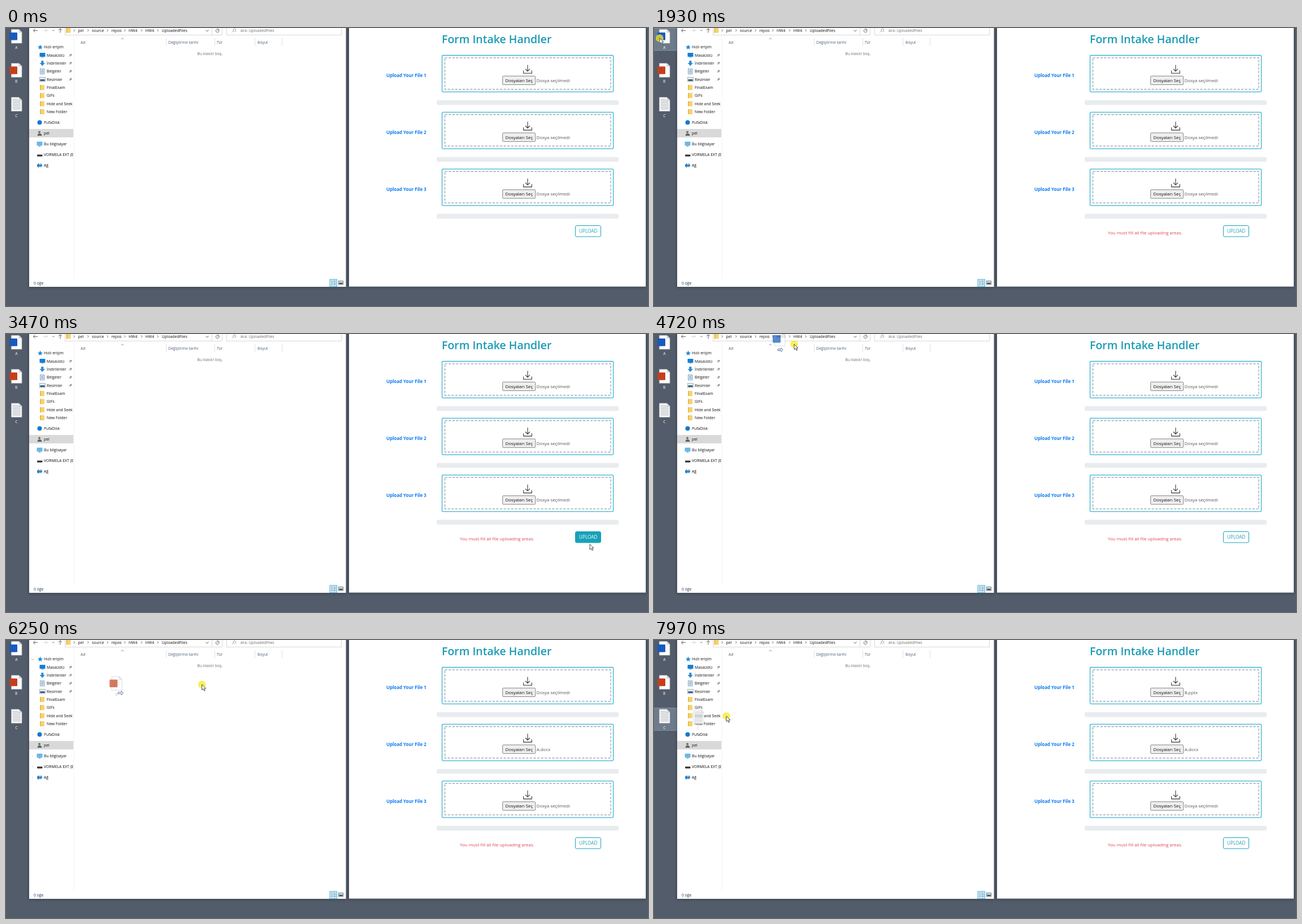
An HTML page for the animation above (8000 ms loop, 1136x493 px).

```html
<!DOCTYPE html>
<html lang="tr">
<head>
<meta charset="utf-8">
<title>Upload demo</title>
<style>
  html, body { margin: 0; width: 100%; height: 100%; overflow: hidden; background: #535c6a; }
  svg { display: block; }
  text { font: 6.85px "Open Sans", "Noto Sans", sans-serif; fill: #111; }
  .page text { font-size: 7.9px; fill: #555; }
  .page .title { font-size: 19.5px; font-weight: 600; fill: #1c9bb5; }
  .page .label { font-weight: 700; fill: #0d7bf2; }
  .page .pick { fill: #111; }
  .page .error { fill: #dc4450; }
  .send rect { fill: #fff; stroke: #17a2b8; }
  .page .send text { font-size: 8.2px; fill: #17a2b8; }
  .send.hover rect { fill: #17a2b8; }
  .page .send.hover text { fill: #fff; }
  .column { fill: #4a607c; }
  .soft { fill: #6d6d6d; }
  .status { fill: #1e395b; }
  .caption { fill: #fff; text-anchor: middle; }
  .mid { text-anchor: middle; }
  .line { fill: none; stroke: #555; stroke-width: .9; }
  .rule { fill: none; stroke: #e2e2e2; }
  #ghost { opacity: .7; }
  #ghost .caption { fill: #aaa; }
  #tip text { fill: #1d3a9c; }
</style>
</head>
<body>
<svg id="stage" width="1136" height="493" viewBox="0 0 1136 493">
  <defs>
    <filter id="shade" x="-5%" y="-5%" width="110%" height="110%">
      <feDropShadow dx="0" dy="1" stdDeviation="2.5" flood-color="#20262f" flood-opacity=".55"/>
    </filter>
    <clipPath id="nav"><rect x="41" y="0" width="78.5" height="459"/></clipPath>
    <path id="sheet" d="M9.5 2.5H23L28 7.5V27H9.5Z" fill="#fdfdfd" stroke="#b9bcc2" stroke-width=".7"/>
    <path id="fold" d="M23 2.5V7.5H28Z" fill="#dfe1e5" stroke="#b0b3b9" stroke-width=".6"/>
  </defs>
  <rect width="1136" height="493" fill="#535c6a"/>
  <g id="desktop"></g>
  <g id="explorer">
    <rect x="41" y="-20" width="560.5" height="479" fill="#fff" filter="url(#shade)"/>
  </g>
  <g class="page" id="page">
    <rect x="607" y="-20" width="525" height="478.5" fill="#fff" filter="url(#shade)"/>
    <text class="title" x="771" y="27">Form Intake Handler</text>
    <g id="slots"></g>
    <text class="error" id="error" x="803" y="365.5">You must fill all file uploading areas.</text>
    <g class="send" id="send">
      <rect x="1007.5" y="350.5" width="45" height="19.5" rx="2.2"/>
      <text class="mid" x="1030.2" y="363.3">UPLOAD</text>
    </g>
  </g>
  <g id="ghost"></g>
  <path id="arrow" class="line" style="stroke:#50709c" d="M-4 -1.3H2V-3.5L5 0L2 3.5V1.3H-4Z"/>
  <circle id="press" r="6.8" fill="#f8e920" fill-opacity=".75"/>
  <g id="tip">
    <rect x="6.5" y="7.5" width="40.5" height="11.5" fill="#fff" stroke="#a5a5a5" stroke-width=".9"/>
    <path d="M9.3 13.2H14.9M12.1 10.4V16" stroke="#1d3a9c" stroke-width="1.4"/>
    <text x="17.6" y="15.8">Kopyala</text>
  </g>
  <path id="cursor" d="M0 0V9.6L2.3 7.5L4 11.2L5.6 10.5L4 6.9H7Z" fill="#fff" stroke="#222" stroke-width=".8"/>
</svg>
<script>
const $ = id => document.getElementById(id);
const add = (id, markup) => $(id).insertAdjacentHTML('beforeend', markup);
const text = (x, y, s, cls = '') => `<text x="${x}" y="${y}" class="${cls}">${s}</text>`;
const box = (x, y, w, h, fill, extra = '') =>
  `<rect x="${x}" y="${y}" width="${w}" height="${h}" fill="${fill}" ${extra}/>`;
const path = (d, extra = 'class="line"') => `<path d="${d}" ${extra}/>`;

// Desktop files
const files = ['A', 'B', 'C'];
const marks = ['#185abd', '#c43e1c'];
function fileIcon(i) {
  const rows = Array.from({ length: 8 }, (_, r) => `M11.5 ${6 + r * 2.5}H${r ? 26 : 21}`).join('');
  const mark = marks[i]
    ? box(6, 8, 14, 13.5, marks[i], 'rx="1"')
    : path(rows, 'stroke="#a4a8ae" stroke-width=".9"');
  return `<g transform="translate(0 ${i * 60.2})"><use href="#sheet"/><use href="#fold"/>${mark}`
    + text(18.3, 37.3, files[i], 'caption') + '</g>';
}
files.forEach((f, i) => {
  add('desktop', box(-.5, i * 60.2 + .3, 40.5, 39.5, '#7d8c9d',
    `id="hot${i}" fill-opacity=".65" stroke="#93a1b0" stroke-width=".8"`));
  add('desktop', fileIcon(i));
  add('ghost', `<g id="ghost${i}">${fileIcon(i)}</g>`);
});

// Explorer
const folder = (x, y) => box(x, y - 4.5, 8, 9, '#f6d271', 'rx=".6"') + box(x, y - 4.5, 2, 9, '#e9bb4b');
const screen = (x, y, c) => box(x, y - 4, 10, 7, c, 'rx=".5"') + box(x + 3, y + 3.5, 4, 1, '#5d7c94');
const nav = [
  ['Hızlı erişim', 34, 67, path('M60.5 29.3L61.8 32.4L65 32.7L62.6 34.8L63.3 38L60.5 36.3L57.7 38L58.4 34.8L56 32.7L59.2 32.4Z', 'fill="#2389d7"')],
  ['Masaüstü', 48.3, 72, screen(59.5, 48, '#1580d8')],
  ['İndirilenler', 62.6, 72, path('M62.3 58H66.3V62H69L64.3 67.3L59.6 62H62.3Z', 'fill="#2b8bd6"')],
  ['Belgeler', 77, 72, box(60.5, 72.5, 7.5, 9, '#e8f1fa', 'stroke="#6d8fb0" stroke-width=".8"') + path('M62 75H66.5M62 77H66.5M62 79H66.5', 'stroke="#4683c0" stroke-width=".8"')],
  ['Resimler', 91.2, 72, box(59.5, 87.3, 10, 7.5, '#e4eef5', 'stroke="#8a98a5" stroke-width=".7"') + box(60.5, 91, 8, 3, '#41607a')],
  ...['FinalExam', 'GIFs', 'Hide and Seek', 'New Folder'].map((s, i) => {
    const y = 105.5 + i * 14.35;
    return [s, y, 72, folder(60, y)];
  }),
  ['PufaDisk', 167.6, 67, '<circle cx="59.5" cy="167.6" r="4" fill="#1279d0"/>'],
  ['pel', 186.6, 67, '<circle cx="59" cy="184.5" r="2.1" fill="#8b6a55"/>' + path('M55.5 191Q56 186.8 59.5 187Q63 187 63.5 191Z', 'fill="#4c6670"')],
  ['Bu bilgisayar', 205.8, 67, screen(54.5, 205.5, '#67b7e8')],
  ['VORMELA EXT (E:)', 224.8, 67, box(55, 224.5, 9.5, 3.2, '#333', 'rx="1"')],
  ['Ağ', 244, 67, path('M55 242L59 240V242.2H61V239.4L64.5 243.5L61 247.8V245.6H59V247.5L55 246Z', 'fill="#2f86c5"')]
];
const open = [0, 9, 10, 11, 12, 13];
add('explorer', box(41, 179, 78.3, 15, '#d9d9d9'));
add('explorer', '<g clip-path="url(#nav)">' + nav.map(([s, y, x, icon]) => icon + text(x, y + 2.4, s)).join('') + '</g>');
add('explorer', nav.slice(1, 5).map(([, y]) =>
  `<g transform="translate(114 ${y}) rotate(45)">${box(-1.4, -2.7, 2.8, 3, '#8e979e')}${path('M-2.3 .7H2.3M0 .7V3.5', 'stroke="#8e979e" stroke-width=".9"')}</g>`).join(''));
add('explorer', '<g id="twigs">' + open.map(i => {
  const y = nav[i][1];
  return i ? path(`M46 ${y - 2}L48 ${y}L46 ${y + 2}`, 'fill="none" stroke="#d4d4d4" stroke-width=".8"')
    : path(`M44.5 ${y - 1}L47 ${y + 1.5}L49.5 ${y - 1}`, 'fill="none" stroke="#999" stroke-width=".8"');
}).join('') + '</g>');

add('explorer', path('M120 14V445', 'stroke="#f3f3f3"')
  + path('M104.5 0V12.5H382.5V0M364.5 0V12.5M390.5 0V12.5H593.5V0', 'class="rule" style="stroke:#d9d9d9"')
  + path('M283.5 18V32M369.5 18V32M440.5 18V32M488.5 18V32', 'class="rule"')
  + path('M56 4.5H48.5M51.5 1.5L48.5 4.5L51.5 7.5M93 4L96 1L99 4M96 1V8.5')
  + path('M66 4.5H73M70 1.5L73 4.5L70 7.5', 'fill="none" stroke="#ccc" stroke-width=".9"')
  + path('M82 3.5L83.7 5.2L85.4 3.5M353.5 3.5L356 6L358.5 3.5')
  + path('M376.5 3A2.9 2.9 0 1 1 373.5 2M374 .5L376.6 2.8L373.7 4')
  + path('M400 7.5L402.5 5M402.5 5A2.3 2.3 0 1 1 404 6', 'class="line" style="stroke:#888"')
  + path('M203.5 20L206 17.8L208.5 20', 'class="line" style="stroke:#888"')
  + folder(106.5, 4));
[[127.5, 'pel'], [152, 'source'], [186.5, 'repos'], [217, 'HW4'], [246.8, 'HW4'], [275.5, 'UploadedFiles']]
  .forEach(([x, s]) => add('explorer', text(x, 6.8, s) + path(`M${x - 7.8} 2.3L${x - 5.8} 4.3L${x - 7.8} 6.3`)));
[[132, 'Ad'], [287, 'Değiştirme tarihi'], [373, 'Tür'], [445, 'Boyut']]
  .forEach(([x, s]) => add('explorer', text(x, 27.5, s, 'column')));
add('explorer', text(415, 6.8, 'Ara: UploadedFiles', 'soft')
  + text(361, 48.3, 'Bu klasör boş.', 'soft mid')
  + text(49, 455, '0 öğe', 'status')
  + box(573, 445.8, 12.5, 13, '#cdeaf8', 'stroke="#4ba6cf" stroke-width=".9"')
  + path('M575.5 449H578M575.5 452H578M575.5 455H578M579.5 449H583.5M579.5 452H583.5M579.5 455H583.5', 'stroke="#527990" stroke-width=".9"')
  + box(588.5, 448.7, 8, 6, '#dce9f2', 'stroke="#555" stroke-width=".8"') + box(589.5, 451.5, 6, 2.5, '#3c5d78'));

// Upload areas
for (let i = 0; i < 3; i++) {
  add('slots', `<g transform="translate(0 ${i * 100.8})">`
    + text(673, 87.2, `Upload Your File ${i + 1}`, 'label')
    + box(771.6, 48.5, 303, 64.8, '#fff', 'rx="1.5" stroke="#38b3d3" stroke-width="1.3"')
    + box(776.6, 52.8, 293.5, 55.8, 'none', 'stroke="#8d9ea5" stroke-width="1.2" stroke-dasharray="4.2 2.4"')
    + path('M923 65.5V76.5M919 72.7L923 76.7L927 72.7M915.7 75.5V80.3H930.3V75.5', 'fill="none" stroke="#333" stroke-width="1.1"')
    + box(878.7, 85.2, 58, 15.3, '#efefef', 'rx="1.5" stroke="#777" stroke-width=".9"')
    + text(907.8, 95.8, 'Dosyaları Seç', 'pick mid')
    + `<text id="name${i}" x="938.7" y="95.8"></text>`
    + box(762, 128, 322, 8.5, '#e9ecef', 'rx="2.5"') + '</g>');
}

const LOOP = 8000, STEP = 77.3, LEAD = 25;
const route = [
  [0, 1000, -20], [7, 1033, 363], [14, 1033, 363], [15, 880, 300], [16, 520, 170], [17, 175, 66],
  [19, 60, 24], [22, 10, 18], [25, 10, 18], [27, 110, 28], [29, 640, 62], [30, 914, 69], [31, 912, 70],
  [36, 960, 92], [39, 1033, 360], [43, 1033, 362], [46, 1033, 378], [48, 1033, 378],
  [49, 960, 340], [51, 500, 150], [54, 60, 24], [56, 10, 18], [59, 10, 18], [60, 214, 12], [61, 248, 18],
  [63, 640, 110], [66, 1044, 205], [68, 1044, 205], [69, 1060, 222], [72, 783, 193],
  [74, 300, 80], [75, 120, 38], [77, 16, 76], [78, 16, 76], [79, 40, 77], [82, 500, 80],
  [87, 1027, 88], [88, 1027, 90], [90, 1027, 90], [93, 700, 100], [96, 120, 125], [98, 18, 133],
  [100, 18, 133], [102, 78, 134], [103, 128, 135]
];
const grabs = [[10, 18], [16, 76], [18, 133]];
const drags = [[26, 36, 0], [60, 68, 0], [79, 90, 1], [101, 200, 2]];
const presses = [[7, 9], [24, 36], [40, 42], [58, 68], [77, 90], [100, 200]];

const within = (k, a, b) => k >= a && k < b;
const show = (id, on) => { $(id).style.display = on ? '' : 'none'; };
const place = (id, x, y) => $(id).setAttribute('transform', `translate(${x} ${y})`);

function pointer(k) {
  const n = route.findIndex(p => p[0] >= k);
  if (n < 1) return route[n < 0 ? route.length - 1 : 0].slice(1);
  const [k0, x0, y0] = route[n - 1], [k1, x1, y1] = route[n];
  const u = (k - k0) / (k1 - k0);
  return [x0 + (x1 - x0) * u, y0 + (y1 - y0) * u];
}

function draw(k) {
  const [x, y] = pointer(k), [px, py] = pointer(k - 1);
  const drag = drags.find(([a, b]) => within(k, a, b));
  place('cursor', x, y);
  place('press', x, y);
  place('tip', x, y);
  place('arrow', px + 9, py + 16);
  show('press', presses.some(([a, b]) => within(k, a, b)));
  show('tip', drag && x > 607);
  show('arrow', drag && x > 150 && x < 601);
  show('ghost', drag);
  files.forEach((f, i) => {
    const held = drag && drag[2] === i;
    show('ghost' + i, held);
    const over = x < 40 && y >= i * 60 && y < i * 60 + 40;
    show('hot' + i, over || held && x < 150);
  });
  if (drag) {
    const [gx, gy] = grabs[drag[2]];
    place('ghost', px - gx, py - gy);
  }
  show('twigs', within(k, 27, 34) || within(k, 80, 91));
  show('error', k >= 11);
  $('send').classList.toggle('hover', within(k, 6, 15) || within(k, 39, 46));
  const empty = 'Dosya seçilmedi';
  $('name0').textContent = k >= 90 ? 'B.pptx' : within(k, 36, 42) ? 'A.docx' : empty;
  $('name1').textContent = k >= 68 ? 'A.docx' : empty;
  $('name2').textContent = empty;
}

const start = performance.now();
function tick() {
  const t = (performance.now() - start) % LOOP;
  draw(Math.floor((t + LEAD) / STEP));
  requestAnimationFrame(tick);
}
tick();
</script>
</body>
</html>
```
